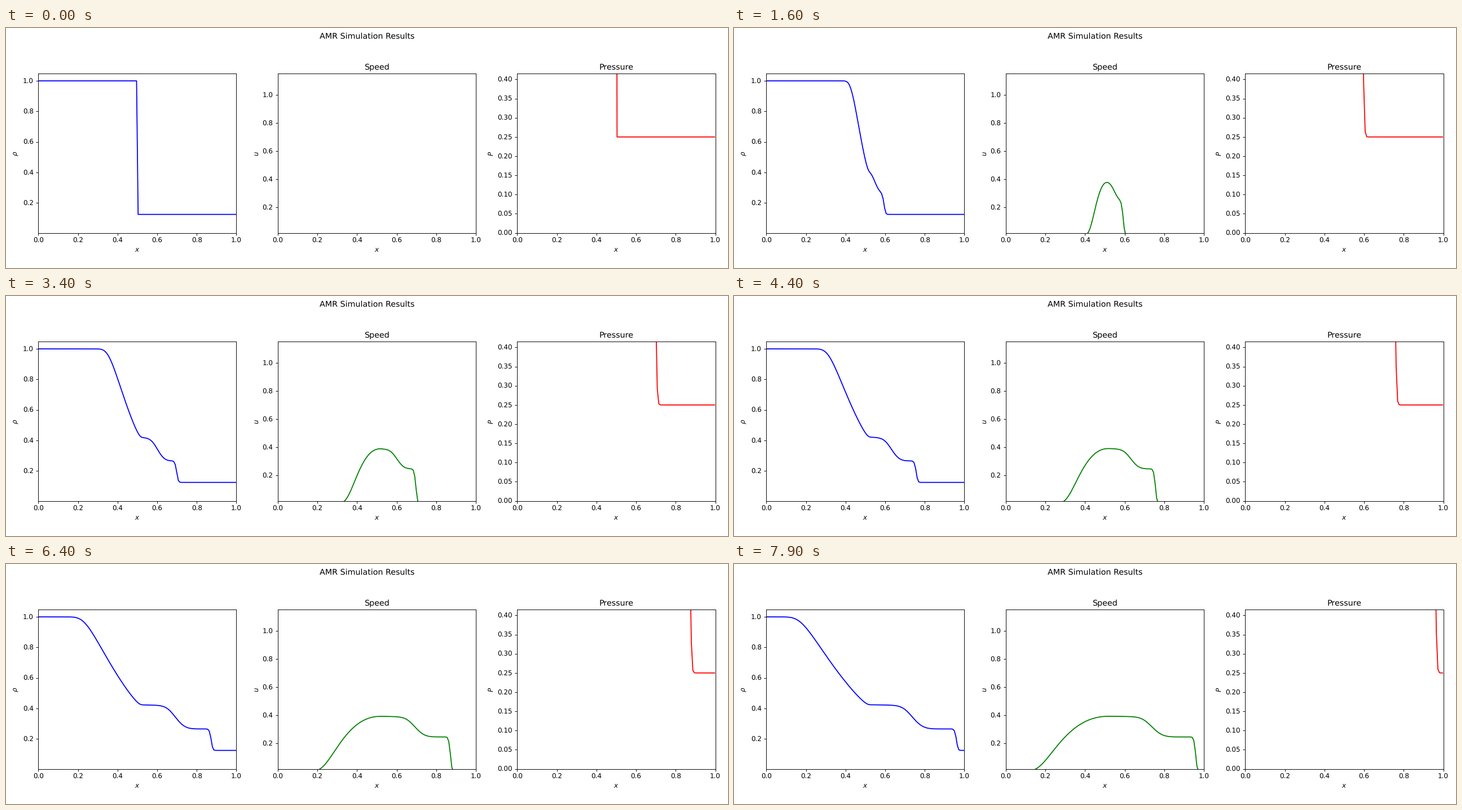
A matplotlib script for the animation above (8 s loop, 1280x427 px).

```python
import numpy as np
import matplotlib.pyplot as plt
from matplotlib.animation import FuncAnimation

W, H, DPI = 1280, 427, 256 / 3
FRAMES, INTERVAL = 80, 100

# Shock tube on a uniform grid, one solver step per frame
GAMMA = 1.4
CELLS = 128
DT = 0.003311

x = (np.arange(CELLS) + 0.5) / CELLS


def initial_state():
    left = x < 0.5
    rho = np.where(left, 1.0, 0.125)
    pressure = np.where(left, 1.0, 0.1)
    return np.array([rho, np.zeros(CELLS), pressure / (GAMMA - 1)])


def flux_and_speeds(state):
    rho, mom, energy = state
    u = mom / rho
    p = (GAMMA - 1) * (energy - 0.5 * mom * u)
    c = np.sqrt(GAMMA * p / rho)
    return np.array([mom, mom * u + p, (energy + p) * u]), u - c, u + c


def step(state):
    """Advance one first-order HLL step with open ends."""
    q = np.pad(state, ((0, 0), (1, 1)), mode="edge")
    f, slow, fast = flux_and_speeds(q)
    sl = np.minimum(0, np.minimum(slow[:-1], slow[1:]))
    sr = np.maximum(0, np.maximum(fast[:-1], fast[1:]))
    jump = q[:, 1:] - q[:, :-1]
    face = (sr * f[:, :-1] - sl * f[:, 1:] + sl * sr * jump) / (sr - sl)
    return state - DT * CELLS * (face[:, 1:] - face[:, :-1])


states = [initial_state()]
while len(states) < FRAMES:
    states.append(step(states[-1]))

plt.rcParams["text.hinting"] = "none"

# The tiny margin keeps the pixel size from rounding down
fig = plt.figure(figsize=((W + 1e-6) / DPI, (H + 1e-6) / DPI), dpi=DPI)
fig.suptitle("AMR Simulation Results")

AX_LEFT, AX_STEP, AX_WIDTH = 57.3, 424.55, 351.1
AX_TOP, AX_BOTTOM = 81.4, 364.6


def panel(column, title, label, ylim, color):
    left = AX_LEFT + column * AX_STEP
    ax = fig.add_axes([left / W, 1 - AX_BOTTOM / H,
                       AX_WIDTH / W, (AX_BOTTOM - AX_TOP) / H])
    ax.set(xlim=(0, 1), ylim=ylim, title=title, xlabel="$x$", ylabel=label)
    return ax.plot([], [], color=color)[0]


lines = [
    panel(0, "", r"$\rho$", (0.0036, 1.0468), "blue"),
    panel(1, "Speed", "$u$", (0.0194, 1.150), "green"),
    panel(2, "Pressure", "$P$", (0, 0.4146), "red"),
]


def draw(i):
    for line, values in zip(lines, states[i]):
        line.set_data(x, values)
    return lines


anim = FuncAnimation(fig, draw, frames=FRAMES, interval=INTERVAL,
                     init_func=lambda: draw(0), repeat=True, repeat_delay=0)
plt.show()
```
